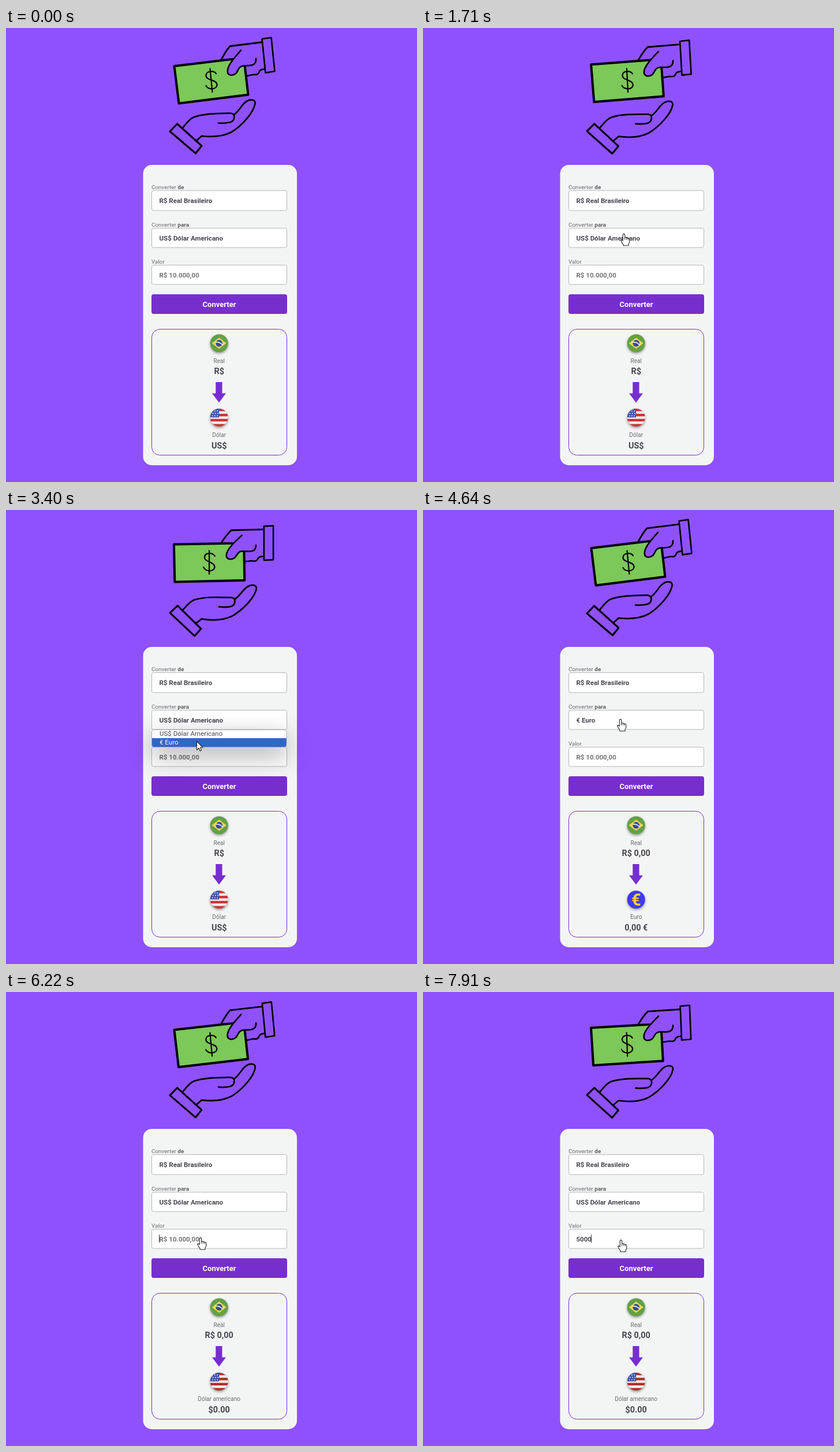
An HTML page with a canvas for the animation above (7.99 s loop, 712 by 786 pixels).

```html
<!DOCTYPE html>
<html lang="pt-BR">
<head>
<meta charset="utf-8">
<title>Conversor de moedas</title>
<style>
  html, body { margin: 0; width: 100%; height: 100%; overflow: hidden; background: #8f51fc; }
  canvas { display: block; width: 712px; height: 786px; }
</style>
</head>
<body>
<canvas id="stage" width="712" height="786"></canvas>
<script>
const ctx = document.getElementById('stage').getContext('2d');
const LOOP = 7990, SWING = 1540;
const PURPLE = '#8f51fc', ACCENT = '#772ecf', CARD = '#f3f5f5', INK = '#48464d';
const SANS = 'Roboto, sans-serif';

// Moments at which the page changes
const OPEN_1 = 2850, PICK_EURO = 3640, OPEN_2 = 4770, PICK_DOLLAR = 5330, FOCUS = 6150;
const KEYS = [7300, 7510, 7650, 7840];

// Pointer path: time, x, y
const TRACK = [
  [800, 652, 782], [840, 642, 766], [980, 422, 510], [1200, 395, 480], [1300, 375, 440],
  [1520, 348, 356], [2950, 348, 356], [3300, 330, 400], [3750, 330, 400], [4060, 342, 362],
  [4860, 342, 362], [5100, 335, 387], [5450, 335, 387], [5800, 337, 400], [6080, 337, 425],
  [6300, 337, 425], [6540, 343, 429]
];

const smooth = u => { u = Math.min(1, Math.max(0, u)); return u * u * (3 - 2 * u); };

function pointerAt(t) {
  if (t < TRACK[0][0]) return null;
  const i = TRACK.findIndex(k => k[0] > t);
  if (i < 0) { const k = TRACK[TRACK.length - 1]; return { x: k[1], y: k[2] }; }
  const a = TRACK[i - 1], b = TRACK[i], u = (t - a[0]) / (b[0] - a[0]);
  return { x: a[1] + (b[1] - a[1]) * u, y: a[2] + (b[2] - a[2]) * u };
}

function swingAt(t) {
  const p = (t % SWING) / SWING;
  return 1.08 * (smooth(p / 0.26) - smooth((p - 0.475) / 0.46));
}

function text(str, x, y, size, { weight = 400, color = INK, align = 'left' } = {}) {
  ctx.font = `${weight} ${size}px ${SANS}`;
  ctx.fillStyle = color;
  ctx.textAlign = align;
  ctx.fillText(str, x, y);
  return ctx.measureText(str).width;
}

function box(x, y, w, h, r, fill, line) {
  ctx.beginPath();
  ctx.roundRect(x, y, w, h, r);
  if (fill) { ctx.fillStyle = fill; ctx.fill(); }
  if (line) { ctx.strokeStyle = line; ctx.lineWidth = 1; ctx.stroke(); }
}

function shape(d, fill, line, width) {
  const p = new Path2D(d);
  if (fill) { ctx.fillStyle = fill; ctx.fill(p); }
  if (line) { ctx.strokeStyle = line; ctx.lineWidth = width; ctx.stroke(p); }
}

function disc(x, y, r, fill) {
  ctx.beginPath();
  ctx.arc(x, y, r, 0, Math.PI * 2);
  ctx.fillStyle = fill;
  ctx.fill();
}

function turned(x, y, degrees, draw) {
  ctx.save();
  ctx.translate(x, y);
  ctx.rotate(degrees * Math.PI / 180);
  ctx.translate(-x, -y);
  draw();
  ctx.restore();
}

function givingHand() {
  shape('M291.5 66 L412 51.5 L419.5 115.5 L299.5 130.5 Z', '#7cc858', '#000', 4);
  shape('M364 79 C360 73 347 74 346.5 82 C346 91 364 89 365.5 97 C367 107 350 108 346.5 100 M353.5 70.5 L357.5 111', null, '#000', 2.2);
  shape('M443 25 L387 32 L374 53 L396 52 C390 58 385 66 383.5 73 C382 82 391 85 398 79 C403 74 402 66 412 65.5 L416 65 L418.5 82.5 L433 80 L441 72 L449 71 Z', PURPLE);
  shape('M444 24.5 L388 31.5 C383 37 377 47 373 54.5', null, '#000', 2.8);
  shape('M407 38.5 C397 50 386 62 384 72 C382 82 391 84 398 79 C403 74 402 66 412 65.5 C423 65 434 66 433 53', null, '#000', 2.6);
  shape('M417.5 83 L429 80.5 Q437 82 438.5 76 Q440 71.5 449 71', null, '#000', 2.6);
  shape('M443.5 19 L459.5 16.5 L465.5 75 L449.5 77.5 Z', PURPLE, '#000', 2.6);
}

function takingHand() {
  shape('M306 173 C312 166 317 158 325 154.5 C343 148 365 148 389 147.5 C398 148 397 160 389 163 C382 165 375 165 368 164.5', null, '#000', 2.7);
  shape('M395 150 C403 145 407 135 414 129 C422 122 433 123 431.5 131 C429 146 410 168 391 180 C376 188 356 189 339 187 L330 195', null, '#000', 2.7);
  shape('M284 179 L296.5 166 L339 204 L328.5 217 Z', null, '#000', 3.1);
}

function illustration(t) {
  const s = swingAt(t);
  ctx.lineJoin = ctx.lineCap = 'round';
  turned(355, 57, 6 * s, givingHand);
  turned(305, 181, 2.8 * s, takingHand);
}

function label(y, plain, strong = '') {
  const w = text(plain, 252, y, 9.9, { color: '#6b696e' });
  text(strong, 252 + w, y, 9.9, { weight: 700, color: '#5d5b60' });
}

function field(y, h, str, color = INK) {
  box(252.5, y + 0.5, 234, h, 3, '#fff', '#b6b6b8');
  return text(str, 265.5, y + 21.6, 11.52, { weight: 700, color });
}

// Round badge with a soft drop shadow; draws its content clipped
function badge(y, base, content) {
  ctx.save();
  ctx.shadowColor = 'rgba(0,0,0,.42)';
  ctx.shadowBlur = 4;
  ctx.shadowOffsetY = 2;
  disc(369.2, y, 15.5, base);
  ctx.restore();
  ctx.save();
  ctx.beginPath();
  ctx.arc(369.2, y, 15.5, 0, Math.PI * 2);
  ctx.clip();
  ctx.translate(369.2, y);
  content();
  ctx.restore();
}

function brazil() {
  shape('M-12.5 0 L0 -9.8 L12.5 0 L0 9.8 Z', '#f2d551');
  disc(0, 0, 5.8, '#324b9f');
  shape('M-5.6 -1.8 Q1 -2.6 5.4 2.5', null, '#f4f4f4', 1.6);
}

function usa(red) {
  const h = 31 / 7;
  ctx.fillStyle = red;
  for (let i = 0; i < 7; i += 2) ctx.fillRect(-16, -15.5 + i * h, 32, h);
  ctx.fillStyle = '#3f55ae';
  ctx.fillRect(-16, -16, 16, 15.7);
  for (let r = 0; r < 3; r++)
    for (let c = 0; c < 3; c++) disc(-11.5 + c * 4.2 + (r % 2), -11.5 + r * 4.2, 0.95, '#eef');
}

function euro() {
  text('€', 0, 10.3, 29, { weight: 700, color: '#f6d032', align: 'center' });
}

function results(t) {
  const mid = 369.2, touched = t >= PICK_EURO;
  const isEuro = touched && t < PICK_DOLLAR;
  const name = { color: '#6b696e', align: 'center' };
  const amount = { weight: 700, align: 'center' };
  box(252.5, 521.5, 234, 218, 14, null, ACCENT);
  badge(545.8, '#63a046', brazil);
  text('Real', mid, 579.6, 10.08, name);
  text(touched ? 'R$ 0,00' : 'R$', mid, 599, 14.4, amount);
  shape('M363.3 613 H374.5 V632.5 H381 L369 648.5 L357 632.5 H363.3 Z', ACCENT);
  if (isEuro) badge(674.5, '#4039f5', euro);
  else badge(674.5, '#f2f0ef', () => usa(touched ? '#b0302e' : '#ce3238'));
  text(isEuro ? 'Euro' : touched ? 'Dólar americano' : 'Dólar', mid, 708.2, 10.08, name);
  text(isEuro ? '0,00 €' : touched ? '$0.00' : 'US$', mid, 727.5, 14.4, amount);
}

function menu(active) {
  ctx.save();
  ctx.shadowColor = 'rgba(0,0,0,.36)';
  ctx.shadowBlur = 42;
  ctx.shadowOffsetY = 14;
  box(252.5, 380.5, 233.5, 30, 4, '#fff');
  ctx.restore();
  ctx.save();
  box(252.5, 380.5, 233.5, 30, 4, '#fff');
  ctx.clip();
  ctx.fillStyle = '#2f66cb';
  ctx.fillRect(252, active ? 395 : 380, 235, active ? 16 : 15);
  ctx.restore();
  box(252.5, 380.5, 233.5, 30, 4, null, '#a9a9ad');
  ['US$ Dólar Americano', '€ Euro'].forEach((str, i) =>
    text(str, 266, 391.3 + i * 15, 11.52, { color: i === active ? '#fff' : INK }));
}

function pointer(p, hand) {
  ctx.save();
  ctx.translate(p.x, p.y);
  shape(hand
    ? 'M-1.7 1.5 Q0 -.8 1.7 1.5 V7 Q3.4 5.8 4.6 7.6 Q6.4 6.6 7.3 8.5 Q9.8 7.8 9.8 10.5 V14 Q9.6 16.5 8 18 V20.8 H-1 V18.6 Q-4 15.5 -5.2 11.8 Q-4.8 9.2 -1.7 12.2 Z'
    : 'M.5 .5 V15.5 L4 12.2 L6.2 17.2 L8.6 16.1 L6.4 11.3 H11 Z', '#fff', '#222', 1.1);
  if (hand) shape('M1.7 7 V10.5 M4.6 7.6 V10.5 M7.3 8.5 V11', null, '#222', 0.9);
  ctx.restore();
}

function valueField(t) {
  const digits = KEYS.filter(k => t >= k).length;
  const w = field(410, 33.5, digits ? '5000'.slice(0, digits) : 'R$ 10.000,00', digits ? INK : '#757478');
  const since = t - (digits ? KEYS[digits - 1] : FOCUS);
  if (since >= 0 && since % 1000 < 500) {
    ctx.fillStyle = '#333';
    ctx.fillRect(Math.round(265 + (digits ? w : 0)), 420, 1, 14);
  }
}

function draw(t) {
  ctx.fillStyle = PURPLE;
  ctx.fillRect(0, 0, 712, 786);
  illustration(t);

  const p = pointerAt(t);
  const open = (t >= OPEN_1 && t < PICK_EURO) || (t >= OPEN_2 && t < PICK_DOLLAR);
  const over = (top, bottom) => p && p.x > 252 && p.x < 487 && p.y >= top && p.y < bottom;
  const overButton = over(461, 495);

  box(237.5, 237, 266.5, 520, 15, CARD);
  label(278.6, 'Converter ', 'de');
  field(281, 34.5, 'R$ Real Brasileiro');
  label(343.6, 'Converter ', 'para');
  field(346, 33.5, t >= PICK_EURO && t < PICK_DOLLAR ? '€ Euro' : 'US$ Dólar Americano');
  label(407.6, 'Valor');
  valueField(t);
  box(252, 461, 235, 34, 4, overButton ? '#9058d8' : ACCENT);
  text('Converter', 369.5, 482.8, 13, { weight: 700, color: '#fff', align: 'center' });
  results(t);

  if (open) menu(over(380, 395) ? 0 : over(395, 411) || t >= OPEN_2 ? 1 : 0);
  if (p) pointer(p, overButton || over(346, 380) || (!open && over(410, 444)));
}

function frame(now) {
  draw(now % LOOP);
  requestAnimationFrame(frame);
}
draw(0);
requestAnimationFrame(frame);
</script>
</body>
</html>
```
